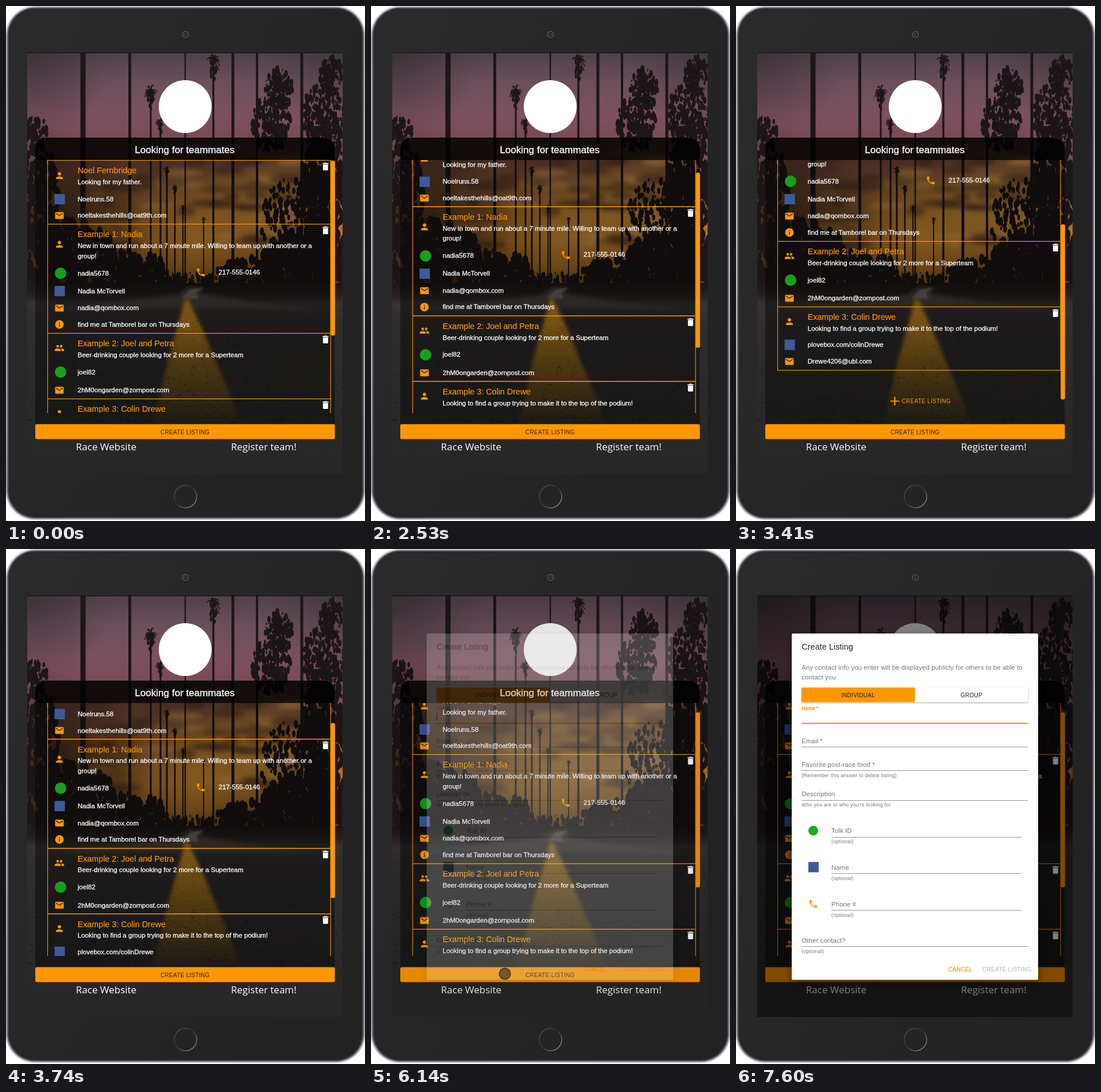
An HTML page with a canvas for the animation above (8000 ms loop, 625 px wide and 896 px high).

```html
<!DOCTYPE html>
<html lang="en">
<head>
<meta charset="utf-8">
<title>Race teammates</title>
<style>
@property --scroll { syntax: "<number>"; inherits: true; initial-value: 0; }
html, body { margin: 0; width: 100%; height: 100%; overflow: hidden; background: #fff; }
svg, canvas { position: absolute; left: 0; top: 0; display: block; }
canvas { left: 37px; top: 82px; }
text { font-family: "Liberation Sans", Arial, sans-serif; white-space: pre; }
.title { font-size: 14.3px; fill: #ff9800; stroke: #ff9800; stroke-width: .15px; }
.item { font-size: 11.6px; fill: #fff; stroke: #fff; stroke-width: .3px; }
.head { font-size: 17.1px; fill: #fff; stroke: #fff; stroke-width: .35px; text-anchor: middle; }
.link { font-family: "Open Sans", "Noto Sans", sans-serif; font-size: 17px; fill: #fff; text-anchor: middle; }
.btn { font-size: 10px; letter-spacing: .286px; }
.mid { text-anchor: middle; }
.name { font-size: 14.3px; letter-spacing: .1px; fill: #222; }
.field { font-size: 11.4px; letter-spacing: .11px; fill: #757575; }
.hint { font-size: 8.6px; letter-spacing: .29px; fill: #757575; }
.label { font-size: 8.6px; letter-spacing: .08px; fill: #f09000; stroke: #f09000; stroke-width: .25px; }

#ui { animation: scroll 8s step-end infinite; }
#list { transform: translateY(calc(var(--scroll) * -1px)); }
#thumb { transform: translateY(calc(var(--scroll) * .693px)); }
#shade, #dialog { animation: fade 8s step-end infinite; }
#tapOpen { animation: tapOpen 8s step-end infinite; }
#tapForm { animation: tapForm 8s step-end infinite; }
#caret { animation: caret 8s step-end infinite; }
#pointer { animation: pointer 8s step-end infinite; }

@keyframes scroll {
  0% { --scroll: 0; }
  31.625% { --scroll: 30.3; }
  32.25% { --scroll: 72; }
  33.125% { --scroll: 122; }
  34% { --scroll: 168; }
  34.875% { --scroll: 194.3; }
  41.5% { --scroll: 186; }
  42.5% { --scroll: 160; }
  43.5% { --scroll: 129; }
  44.5% { --scroll: 97; }
  45.5% { --scroll: 70; }
  46.75% { --scroll: 48.7; }
  47.75% { --scroll: 42; }
  48.75% { --scroll: 37; }
  49.75% { --scroll: 33; }
  50.75% { --scroll: 29; }
  51.5% { --scroll: 26; }
  52.5% { --scroll: 24; }
  53.5%, 100% { --scroll: 22; }
}
@keyframes fade {
  0% { opacity: 0; }
  75.5% { opacity: .04; }
  76.75% { opacity: .2; }
  77.625% { opacity: .5; }
  78.625% { opacity: .8; }
  79.625% { opacity: .95; }
  80.5%, 100% { opacity: 1; }
}
@keyframes tapOpen { 0% { opacity: 0; } 73.375% { opacity: 1; } 78.625%, 100% { opacity: 0; } }
@keyframes tapForm { 0% { opacity: 0; } 85.375% { opacity: 1; } 95%, 100% { opacity: 0; } }
@keyframes caret { 0% { opacity: 1; } 82.5% { opacity: 0; } 88.25% { opacity: 1; } 94.125%, 100% { opacity: 0; } }
@keyframes pointer { 0% { opacity: 0; } 4.75% { opacity: 1; } 5.875%, 100% { opacity: 0; } }
</style>
</head>
<body>
<svg width="625" height="896">
  <defs>
    <linearGradient id="rim" x1="0" y1="0" x2="0" y2="1">
      <stop offset="0" stop-color="#c4c6c8"/><stop offset=".06" stop-color="#a9abad"/>
      <stop offset=".5" stop-color="#b8babc"/><stop offset=".92" stop-color="#9b9ea1"/>
      <stop offset="1" stop-color="#b4b6b8"/>
    </linearGradient>
    <linearGradient id="glass" x1="0" y1="0" x2="1" y2=".6">
      <stop offset="0" stop-color="#2b2b2b"/><stop offset="1" stop-color="#222"/>
    </linearGradient>
    <linearGradient id="ring" x1="0" y1="0" x2="1" y2="1">
      <stop offset="0" stop-color="#5a5a5a"/><stop offset=".45" stop-color="#303030"/>
      <stop offset="1" stop-color="#a0a0a0"/>
    </linearGradient>
  </defs>
  <rect width="625" height="894" rx="50" fill="url(#rim)"/>
  <rect x="2.5" y="2.5" width="620" height="889" rx="48" fill="#454a50"/>
  <rect x="5.5" y="5.5" width="614" height="883" rx="45" fill="url(#glass)" stroke="#1b1d20"/>
  <circle cx="312.5" cy="49.5" r="5" fill="#1d1d1d" stroke="#5c5c5c" stroke-width="1.4"/>
  <circle cx="312.5" cy="49.5" r="1.6" fill="none" stroke="#666"/>
  <circle cx="312.5" cy="853.5" r="19.5" fill="#242424" stroke="url(#ring)" stroke-width="1.5"/>
  <path d="M37 81.5H586" stroke="#0c0c0c"/>
</svg>

<canvas id="photo" width="549" height="732"></canvas>

<svg id="ui" width="625" height="896">
  <defs>
    <clipPath id="view"><rect x="51" y="268" width="522" height="440"/></clipPath>
    <filter id="lift" x="-10%" y="-10%" width="120%" height="125%">
      <feDropShadow dx="0" dy="5" stdDeviation="7" flood-opacity=".5"/>
    </filter>
    <filter id="low" x="-5%" y="-20%" width="110%" height="160%">
      <feDropShadow dx="0" dy="1" stdDeviation="1" flood-opacity=".45"/>
    </filter>
    <g id="tap">
      <circle r="10.5" fill="#302a24" fill-opacity=".62"/>
      <circle r="9.5" fill="none" stroke="#2a2622" stroke-opacity=".5" stroke-width="2"/>
    </g>
  </defs>

  <circle cx="312" cy="175" r="46" fill="#fff"/>
  <path d="M51 268V249a20 20 0 0 1 20-20H552a20 20 0 0 1 20 20V268Z" fill="#000" fill-opacity=".84"/>
  <rect x="51" y="268" width="521" height="460" fill="#000" fill-opacity=".42"/>
  <text class="head" x="311.2" y="255.5">Looking for teammates</text>

  <g clip-path="url(#view)">
    <g id="list"></g>
    <rect id="thumb" x="565.3" y="269" width="7.5" height="304.5" rx="3" fill="#ff9800"/>
  </g>

  <rect x="51" y="727.5" width="521.5" height="26" rx="2.5" fill="#ff9800"/>
  <text class="btn mid" x="311.8" y="744.5" fill="#2b2210">CREATE LISTING</text>
  <text class="link" x="174.5" y="773">Race Website</text>
  <text class="link" x="448.7" y="773">Register team!</text>

  <rect id="shade" x="37" y="82" width="549" height="732" fill="#000" fill-opacity=".5"/>
  <g id="dialog">
    <rect x="97" y="147" width="429" height="602.5" rx="2.5" fill="#fff" filter="url(#lift)"/>
    <text class="name" x="114.3" y="174.7">Create Listing</text>
    <text class="field" x="114.3" y="210">Any contact info you enter will be displayed publicly for others to be able to</text>
    <text class="field" x="114.3" y="227">contact you</text>
    <rect x="114" y="241" width="394.5" height="25.5" rx="2" fill="#fff" filter="url(#low)"/>
    <path d="M311.5 241H116a2 2 0 0 0-2 2v21.5a2 2 0 0 0 2 2H311.5Z" fill="#ff9800"/>
    <text class="btn mid" x="212.5" y="257.5" fill="#222">INDIVIDUAL</text>
    <text class="btn mid" x="410" y="257.5" fill="#222">GROUP</text>
    <text class="label" x="114.3" y="280">Name *</text>
    <rect id="caret" x="114" y="286" width="1" height="13" fill="#222"/>
    <rect x="114" y="302.5" width="394.5" height="1.8" fill="#dd8a20"/>
    <g id="form"></g>
    <text class="btn" x="369.5" y="735" fill="#ff9800" stroke="#ff9800" stroke-width=".2">CANCEL</text>
    <text class="btn" x="429" y="735" fill="#b5b5b5">CREATE LISTING</text>
  </g>

  <g id="tapOpen"><use href="#tap" x="233" y="739"/></g>
  <g id="tapForm"><use href="#tap" x="299" y="590.5"/></g>
  <path id="pointer" d="M489.5 853.5V868.5L493 865.3L495.3 870.5L497.5 869.5L495.3 864.5H500Z" fill="#fff" stroke="#000" stroke-width=".9"/>
</svg>

<script>
const ORANGE = '#ff9800';
const glyphs = {
  person: 'M12 12c2.21 0 4-1.79 4-4s-1.79-4-4-4-4 1.79-4 4 1.79 4 4 4zm0 2c-2.67 0-8 1.34-8 4v2h16v-2c0-2.66-5.33-4-8-4z',
  group: 'M16 11a3 3 0 1 0 0-6 3 3 0 0 0 0 6zM8 11a3 3 0 1 0 0-6 3 3 0 0 0 0 6zm0 2c-2.33 0-7 1.17-7 3.5V19h14v-2.5c0-2.33-4.67-3.5-7-3.5zm8 0c-.29 0-.62.02-.97.05 1.16.84 1.97 1.97 1.97 3.45V19h6v-2.5c0-2.33-4.67-3.5-7-3.5z',
  mail: 'M20 4H4a2 2 0 0 0-2 2v12a2 2 0 0 0 2 2h16a2 2 0 0 0 2-2V6a2 2 0 0 0-2-2zm0 4l-8 5-8-5V6l8 5 8-5z',
  info: 'M12 2a10 10 0 1 0 0 20 10 10 0 0 0 0-20zm1 15h-2v-6h2zm0-8h-2V7h2z',
  phone: 'M6.62 10.79c1.44 2.83 3.76 5.14 6.59 6.59l2.2-2.2c.27-.27.67-.36 1.02-.24 1.12.37 2.33.57 3.57.57.55 0 1 .45 1 1V20c0 .55-.45 1-1 1-9.39 0-17-7.61-17-17 0-.55.45-1 1-1h3.5c.55 0 1 .45 1 1 0 1.25.2 2.45.57 3.57.11.35.03.74-.25 1.02z',
  trash: 'M6 19a2 2 0 0 0 2 2h8a2 2 0 0 0 2-2V7H6zM19 4h-3.5l-1-1h-5l-1 1H5v2h14z',
  plus: 'M20.5 13.2h-7.3v7.3h-2.4v-7.3H3.5v-2.4h7.3V3.5h2.4v7.3h7.3z'
};
const text = (cls, x, y, s) => `<text class="${cls}" x="${x}" y="${y}">${s}</text>`;
const rule = (x, y, w, h, fill) => `<rect x="${x}" y="${y}" width="${w}" height="${h}" fill="${fill}"/>`;
function icon(kind, x, y, fill = ORANGE, size = 18) {
  if (kind === 'chat') return `<circle cx="${x + 2}" cy="${y}" r="10" fill="#16a01c"/>`;
  if (kind === 'social') return rule(x - 8.5, y - 9, 18, 18, '#3f5a9a');
  return `<path d="${glyphs[kind]}" fill="${fill}" transform="translate(${x - size / 2} ${y - size / 2}) scale(${size / 24})"/>`;
}

// Each card: top, height, icon, icon y, title, lines, contact rows [icon, y, text]
const cards = [
  [268, 111, 'person', 295, 'Noel Fernbridge', ['Looking for my father.'],
    [['social', 336, 'Noelruns.58'], ['mail', 364.5, 'noeltakesthehills@oat9th.com']]],
  [379, 190, 'person', 414.5, 'Example 1: Nadia',
    ['New in town and run about a 7 minute mile. Willing to team up with another or a', 'group!'],
    [['chat', 465, 'nadia5678'], ['social', 496, 'Nadia McTorvell'], ['mail', 525.5, 'nadia@qombox.com'],
      ['info', 554, 'find me at Tamborel bar on Thursdays']]],
  [569, 114, 'group', 595, 'Example 2: Joel and Petra', ['Beer-drinking couple looking for 2 more for a Superteam'],
    [['chat', 637, 'joel82'], ['mail', 668.5, '2hM0ongarden@zornpost.com']]],
  [683, 110.3, 'person', 709, 'Example 3: Colin Drewe', ['Looking to find a group trying to make it to the top of the podium!'],
    [['social', 749.5, 'plovebox.com/colinDrewe'], ['mail', 778.5, 'Drewe4206@ubl.com']]]
];
document.getElementById('list').innerHTML = cards.map(([top, h, kind, y, title, lines, rows]) =>
  `<rect x="72.5" y="${top + .5}" width="492.5" height="${h}" fill="none" stroke="${ORANGE}" stroke-width="1.1"/>` +
  icon(kind, 93, y) + icon('trash', 556.3, top + 11.3, '#fff') +
  text('title', 124.7, top + 23.3, title) +
  lines.map((s, i) => text('item', 124.7, top + 42.2 + i * 17.3, s)).join('') +
  rows.map(([k, ry, s]) => icon(k, 93, ry) + text('item', 124.7, ry + 3.8, s)).join('')
).join('') +
  icon('phone', 339, 463.5) + text('item', 370, 466.5, '217-555-0146') +
  icon('plus', 276.5, 847.5, ORANGE, 21) +
  `<text class="btn" x="288.5" y="851.3" fill="${ORANGE}">CREATE LISTING</text>`;

// Each field: x, baseline, right end, label, hint
const fields = [
  [114.3, 337.5, 508.5, 'Email *', ''],
  [114.3, 378.5, 508.5, 'Favorite post-race food *', '(Remember this answer to delete listing)'],
  [114.3, 430, 508.5, 'Description', 'Who you are or who you\'re looking for'],
  [166, 494, 497, 'Tolk ID', '(optional)'],
  [166, 557.7, 497, 'Name', '(optional)'],
  [166, 621.5, 497, 'Phone #', '(optional)'],
  [114.3, 684.5, 508.5, 'Other contact?', '(optional)']
];
document.getElementById('form').innerHTML = fields.map(([x, y, end, label, hint]) =>
  text('field', x, y, label) + rule(x, Math.round(y + 6.5), end - x, 1, '#959595') + text('hint', x, y + 18, hint)
).join('') +
  '<circle cx="134.5" cy="490" r="8.5" fill="#16b01c"/>' +
  rule(126, 544.5, 18, 18, '#3f5a9a') + icon('phone', 134.5, 617.5);

// Dusk road scene
const g = document.getElementById('photo').getContext('2d');
g.translate(-37, -82);
let seed = 7;
const rnd = () => (seed = (seed * 16807) % 2147483647) / 2147483647;
const DARK = '#1d1617';

function fade(y0, y1, stops) {
  const f = g.createLinearGradient(0, y0, 0, y1);
  stops.forEach(([p, c]) => f.addColorStop(p, c));
  return f;
}
function glow(x, y, r, rgb, alpha) {
  const f = g.createRadialGradient(x, y, 0, x, y, r);
  f.addColorStop(0, `rgba(${rgb},${alpha})`);
  f.addColorStop(1, `rgba(${rgb},0)`);
  g.fillStyle = f;
  g.fillRect(x - r, y - r, r * 2, r * 2);
}
function shape(fill, pts, blur = 0) {
  g.filter = blur ? `blur(${blur}px)` : 'none';
  g.fillStyle = fill;
  g.beginPath();
  pts.forEach(p => g.lineTo(...p));
  g.fill();
  g.filter = 'none';
}
function blob(x, y, rx, ry, fill) {
  g.fillStyle = fill;
  g.beginPath();
  g.ellipse(x, y, rx, ry, 0, 0, 7);
  g.fill();
}
// Drooping sprigs, denser towards the middle
function leaves(x, y, rx, ry, n, size = 4) {
  for (let i = 0; i < n; i++) {
    const a = rnd() * 6.283, r = rnd() ** .65, s = size * (.4 + rnd());
    blob(x + Math.cos(a) * r * rx, y + Math.sin(a) * r * ry, s * .6, s * 1.2, DARK);
  }
}
function trunk(x, top, w, bottom = 490) {
  g.fillStyle = DARK;
  g.fillRect(x - w / 2, top, w, bottom - top);
}
function palm(x, y, r, w) {
  trunk(x, y, w);
  g.strokeStyle = DARK;
  g.lineWidth = r / 10;
  for (let i = 0; i < 22; i++) {
    const a = rnd() * 6.283, k = r * (.5 + rnd() * .5);
    const dx = Math.cos(a) * k * .85, dy = Math.sin(a) * k;
    g.beginPath();
    g.moveTo(x, y);
    g.quadraticCurveTo(x + dx * .6, y + dy * .8 - r * .2, x + dx, y + dy + r * .3);
    g.stroke();
  }
  leaves(x, y + r * .9, r * .32, r * 1.2, 22, r / 6);
}

g.fillStyle = fade(82, 500, [[0, '#50414a'], [.12, '#6b4f5b'], [.26, '#7d5060'], [.36, '#784a54'], [.46, '#80503f'],
  [.58, '#9a6435'], [.78, '#b5722a'], [.92, '#7a4819'], [1, '#33200f']]);
g.fillRect(37, 82, 549, 418);
glow(37, 90, 150, '48,42,46', .6);
glow(586, 90, 130, '48,42,46', .45);
glow(445, 350, 120, '255,180,70', .65);
glow(325, 400, 130, '245,170,55', .7);
g.filter = 'blur(4px)';
for (let i = 0; i < 56; i++)
  blob(130 + rnd() * 400, 265 + rnd() * 155, 12 + rnd() * 34, 2 + rnd() * 8,
    i % 3 ? 'rgba(66,42,34,.5)' : 'rgba(255,185,90,.5)');
g.filter = 'none';
glow(60, 400, 190, '22,17,17', .85);

[[134, 9], [215.5, 5], [312, 2.5], [395, 5], [437, 4], [515, 5]].forEach(([x, w]) => trunk(x, 82, w));
palm(252, 148, 15, 3);
palm(361, 96, 17, 3.5);
palm(269, 203, 11, 3);
palm(280, 285, 8, 3);
palm(294, 315, 7, 2.5);
palm(308, 350, 6, 2);
palm(344, 370, 5, 2);

leaves(475, 145, 24, 36, 150);
leaves(462, 205, 34, 50, 240);
leaves(566, 120, 20, 34, 120);
leaves(552, 200, 38, 66, 360);
leaves(552, 320, 40, 110, 460, 6);
leaves(490, 375, 46, 75, 200, 5);
leaves(535, 445, 95, 50, 420, 8);
leaves(425, 465, 60, 28, 200, 6);
leaves(50, 222, 22, 30, 110);
leaves(58, 320, 34, 80, 240, 6);
leaves(100, 435, 90, 62, 420, 8);
leaves(215, 460, 68, 34, 280, 6);
leaves(310, 478, 80, 14, 140, 4);

g.fillStyle = fade(482, 814, [[0, '#1d1716'], [.06, '#25201f'], [.11, '#383333'], [.2, '#312e2d'], [.7, '#2a2928'], [1, '#272727']]);
g.fillRect(37, 482, 549, 332);
shape('#4b4441', [[80, 528], [220, 512], [300, 502], [318, 489], [345, 490], [338, 500], [420, 514], [560, 530], [420, 526], [220, 526]], 3);
shape('#776c63', [[306, 508], [322, 493], [343, 490], [331, 499], [336, 510]], 1.5);
shape(fade(510, 770, [[0, '#d8941f'], [.15, '#c98a20'], [.4, '#8c641c'], [.65, '#5c461f'], [1, 'rgba(40,38,34,0)']]),
  [[312, 510], [317, 510], [341, 560], [366, 620], [396, 690], [425, 780], [240, 780], [265, 690], [281, 620], [298, 560]], 3);
for (let i = 0; i < 900; i++) {
  const y = 530 + rnd() * 200;
  blob(37 + rnd() * 549, y, 1 + (y - 530) / 90, .9, 'rgba(15,14,13,.28)');
}
</script>
</body>
</html>
```
